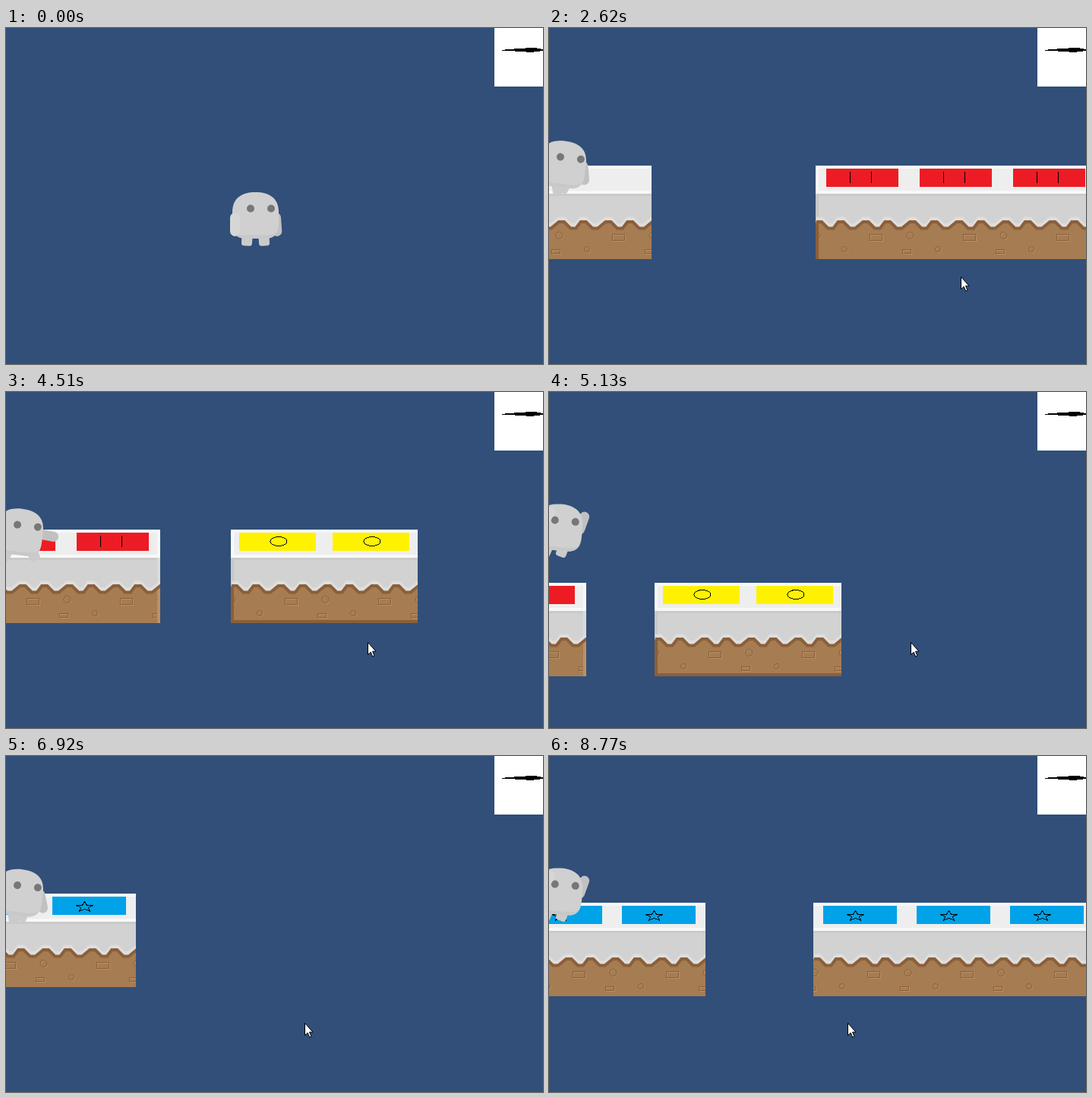
Recreate the animation shown at these times as an HTML page. Size 707 by 442 pixels, loop 8.84 s.

```html
<!DOCTYPE html>
<html lang="en">
<head>
<meta charset="utf-8">
<title>Runner</title>
<style>
html, body { margin: 0; width: 100%; height: 100%; overflow: hidden; background: #314f79; }
#stage { display: block; width: 707px; height: 442px; }
rect, .sharp { shape-rendering: crispEdges; }
.round { shape-rendering: auto; }
</style>
</head>
<body>
<svg id="stage" viewBox="0 0 707 442">
  <rect width="707" height="442" fill="#314f79"/>
  <g id="platforms"></g>
  <g id="hero"></g>
  <rect x="643" width="64" height="77" fill="#fff"/>
  <path class="sharp" d="M651 29L669 27.5 682 27 688 25.8 697 26.2 707 28V30L697 31.4 688 32 680 30.8 654 30Z"/>
  <path id="cursor" d="M-.5 .5V16.5L3.2 13.2 5.7 19 8 18 5.5 12.2H10Z" fill="#fff" stroke="#000"/>
</svg>
<script>
const LOOP = 8840, START = 1320, TILE = 123, GROUND = 181, SPEED = .274;
const $ = id => document.getElementById(id);
const lerp = (a, b, k) => a + (b - a) * k;
const clamp = v => Math.max(0, Math.min(1, v));
const rect = (x, y, w, h, fill, more = '') =>
  `<rect x="${x}" y="${y}" width="${w}" height="${h}" fill="${fill}" ${more}/>`;
const repeat = (n, draw) => Array.from({ length: n }, (_, i) => draw(i)).join(' ');

// Platforms
const star = repeat(10, i => {
  const a = i * Math.PI / 5, r = i % 2 ? .42 : 1;
  return `${55.5 + 12 * r * Math.sin(a)},${17.5 - 6.8 * r * Math.cos(a)}`;
});

const KINDS = {
  white: {},
  red: { fill: '#ed1c24', inset: 14, left: true, right: true,
    icon: '<path d="M45.5 8V23M73.5 8V23"/><path class="bars" d="M45 8.5H74M45 22.5H74"/>' },
  yellow: { fill: '#fff200', inset: 11, left: true, bottom: true,
    icon: '<ellipse cx="63" cy="15.5" rx="11" ry="6"/>' },
  blue: { fill: '#00a2e8', inset: 13, icon: `<polygon points="${star}"/>` }
};

// Eight flat-topped peaks and valleys per tile
const soilLine = n => 'M' + repeat(n * 8 + 2, i => {
  const x = 2.5 + i * TILE / 8 + (i & 2 ? 0 : 2), y = i % 2 ? 82.5 : 74;
  return `${x - 3.5},${y} ${x + 3.5},${y}`;
});

function pebbles(x) {
  const shapes = `<rect x="${x + 71.5}" y="90.5" width="16" height="8"/>
    <circle cx="${x + 38}" cy="110" r="3.5"/>
    <circle cx="${x + 124.5}" cy="92" r="4.5"/>
    <rect x="${x + 114.5}" y="110.5" width="11" height="5"/>`;
  return `<g fill="none" stroke="#ba9066" transform="translate(1 1)">${shapes}</g>
    <g fill="none" stroke="#8b5f39">${shapes}</g>`;
}

function drawPlatform({ kind, n }) {
  const k = KINDS[kind], w = n * TILE + (k.right ? 1 : 0), line = soilLine(n);
  const l = k.left ? 4 : 0, r = k.right ? 4 : 0, b = k.bottom ? 4 : 0;
  const panel = () => rect(k.inset, 4, TILE - 2 * k.inset, 23.5, k.fill) +
    `<g class="sharp" fill="none" stroke="#000">${k.icon}</g>`;
  return `<svg width="${w}" height="${TILE}" overflow="hidden">`
    + rect(0, 0, w, 37, '#f8f8f8') + rect(l, 4, w - l - r, 29, '#eee')
    + rect(0, 37, w, 60, '#d2d2d2') + rect(0, 37, w, 3, '#cacaca')
    + rect(0, 37, l, 50, '#c8c8c8') + rect(w - r, 37, r, 50, '#dadada')
    + `<path d="${line}" transform="translate(0 -4)" fill="none" stroke="#dedede" stroke-width="5"/>
       <path d="${line}V126H-3V74Z" fill="#a67c52"/>`
    + repeat(n + 1, i => pebbles((i - 1) * TILE))
    + rect(0, 76, l, 47, '#8b5f39') + rect(w - r, 76, r, 47, '#bb9164') + rect(0, TILE - b, w, b, '#8b5f39')
    + `<path d="${line}" fill="none" stroke="#8b5f39" stroke-width="4"/>`
    + (k.fill ? repeat(n, i => `<g transform="translate(${i * TILE} 0)">${panel()}</g>`) : '')
    + '</svg>';
}

// x is the left edge at time at; a platform pops in at time from
const PLATFORMS = [
  { kind: 'white', n: 4, x: -127, at: 1780, from: START },
  { kind: 'red', n: 3, x: 159, at: 3320, from: 2060 },
  { kind: 'yellow', n: 2, x: 296, at: 4510, from: 4510, v: .281 },
  { kind: 'blue', n: 2, x: 174, at: 5950, from: 5950 },
  { kind: 'blue', n: 4, x: -20, at: 7780, from: 7480, v: .2687 },
  { kind: 'blue', n: 4, x: 348, at: 8770, from: 8450 }
];
$('platforms').innerHTML = PLATFORMS.map(drawPlatform).join('');
PLATFORMS.forEach((p, i) => p.el = $('platforms').children[i]);
const bars = document.querySelectorAll('.bars');

// The camera follows each jump, so the ground drops: [apex time, ground y at apex]
const JUMPS = [[1600, 250], [3498, 280.5], [5268, 264], [6198, 258.2], [7541, 280.5], [8237, 283]];
const groundY = t => Math.floor(Math.max(GROUND, ...JUMPS.map(([at, y]) => y - 3.156e-4 * (t - at) ** 2)));

// Hero: angles in degrees, limbs swing from straight down towards the right
const STAND = { x: 328.5, y: 246.5, tilt: 0, look: 0, nod: 0, far: 4, near: 0, reach: 18, legL: -4, legR: 4 };
const LEAP = { x: 13.5, y: 178, tilt: 5, look: 0, nod: 0, far: 160, near: 147, reach: 28, legL: -24, legR: -20 };
const FLOAT = { x: 17, y: 177.5, tilt: 0, look: 2, nod: 7, far: 170, near: 170, reach: 18, legL: 9, legR: 10 };
const stride = s => ({ x: 18, y: 181.5 - 2.5 * s, tilt: 6.5, look: 2.5, nod: 0,
  far: 42 - 37 * s, near: -15 + 15 * s, reach: 18, legL: -9 + 19 * s, legR: -27 * s });
const mix = (p, q, k) => Object.fromEntries(Object.keys(p).map(f => [f, lerp(p[f], q[f], k)]));

function heroPose(t, y) {
  if (t < START) return STAND;
  const run = stride(Math.cos((t - 1780) / 420 * 2 * Math.PI));
  if (t < 2070) return run;
  const pose = mix(run, LEAP, clamp((y - GROUND) / 10));
  return mix(pose, FLOAT, clamp(1 - Math.abs(t - 7780) / 140));
}

const BODY = 'M-30.5-4C-30.5-23-18-30.5 0-30.5S30.5-23 30.5-4V10C30.5 24 25 30.5 13 30.5H-13C-25 30.5-30.5 24-30.5 10Z';
const SHADE = 'M-29 21Q-24 30.5-13 30.5H13Q24 30.5 29 21Q24 26 13 26H-13Q-24 26-29 21Z';
const swing = (x, y, len, deg) => {
  const a = deg * Math.PI / 180;
  return [x + len * Math.sin(a), y + len * Math.cos(a)];
};
function arm(x, deg, len, color) {
  const [hx, hy] = swing(x, 3, len, deg);
  return `<line x1="${x}" y1="3" x2="${hx}" y2="${hy}" stroke="${color}" stroke-width="13" stroke-linecap="round"/>`;
}
function leg(x, deg) {
  const at = swing(x, 14, 19, deg);
  return rect(-7, -7, 14, 14, '#cbcbcb', `rx="3.5" class="round" transform="translate(${at}) rotate(${-deg})"`);
}
const eye = (x, y) => `<circle cx="${x}" cy="${y}" r="5" fill="#777"/>`;

function drawHero(p) {
  return `<g transform="translate(${p.x} ${p.y})">`
    + arm(27, p.far, 18, '#c1c1c1') + leg(-10, p.legL) + leg(10, p.legR)
    + `<g transform="rotate(${p.tilt})"><path d="${BODY}" fill="#d0d0d0"/><path d="${SHADE}" fill="#c8c8c8"/>`
    + eye(p.look - 6.5, p.nod - 9) + eye(p.look + 20.5, p.nod - 9) + '</g>'
    + arm(-27, p.near, p.reach, '#d6d6d6') + '</g>';
}

// Pointer moves: start, end, then the place reached
const ENTRY = [526, 135];
const MOVES = [[330, 590, 554, 314], [730, 850, 622, 355], [2060, 2130, 543, 327],
  [4300, 4370, 477, 329], [6300, 6370, 394, 351]];
function pointerAt(t) {
  let [x, y] = ENTRY;
  for (const [from, to, tx, ty] of MOVES) {
    const n = Math.round((to - from) / 65);
    const k = clamp(Math.floor((t - from) / (to - from) * n) / n);
    x = lerp(x, tx, k);
    y = lerp(y, ty, k);
  }
  return `translate(${Math.round(x)} ${Math.round(y)})`;
}

// The game redraws every 70 ms, restarting its beat after each hitch
const HITCHES = [START, 1780, 5880, 7780, 7860];
function tick(t) {
  const from = HITCHES.filter(h => h <= t).pop();
  return from ? from + Math.floor((t - from) / 70) * 70 : t;
}

function render(ms) {
  const now = ms % LOOP, t = tick(now), y = groundY(t);
  for (const p of PLATFORMS) {
    const x = Math.round(p.x - (p.v || SPEED) * (t - p.at));
    p.el.style.display = t >= p.from ? '' : 'none';
    p.el.setAttribute('x', x);
    p.el.setAttribute('y', y);
  }
  bars.forEach(b => b.style.display = y > GROUND ? '' : 'none');
  $('hero').innerHTML = drawHero(heroPose(t, y));
  $('cursor').style.display = now < MOVES[0][0] ? 'none' : '';
  $('cursor').setAttribute('transform', pointerAt(now));
}

const begin = performance.now();
function frame() {
  render(performance.now() - begin);
  requestAnimationFrame(frame);
}
frame();
</script>
</body>
</html>
```
